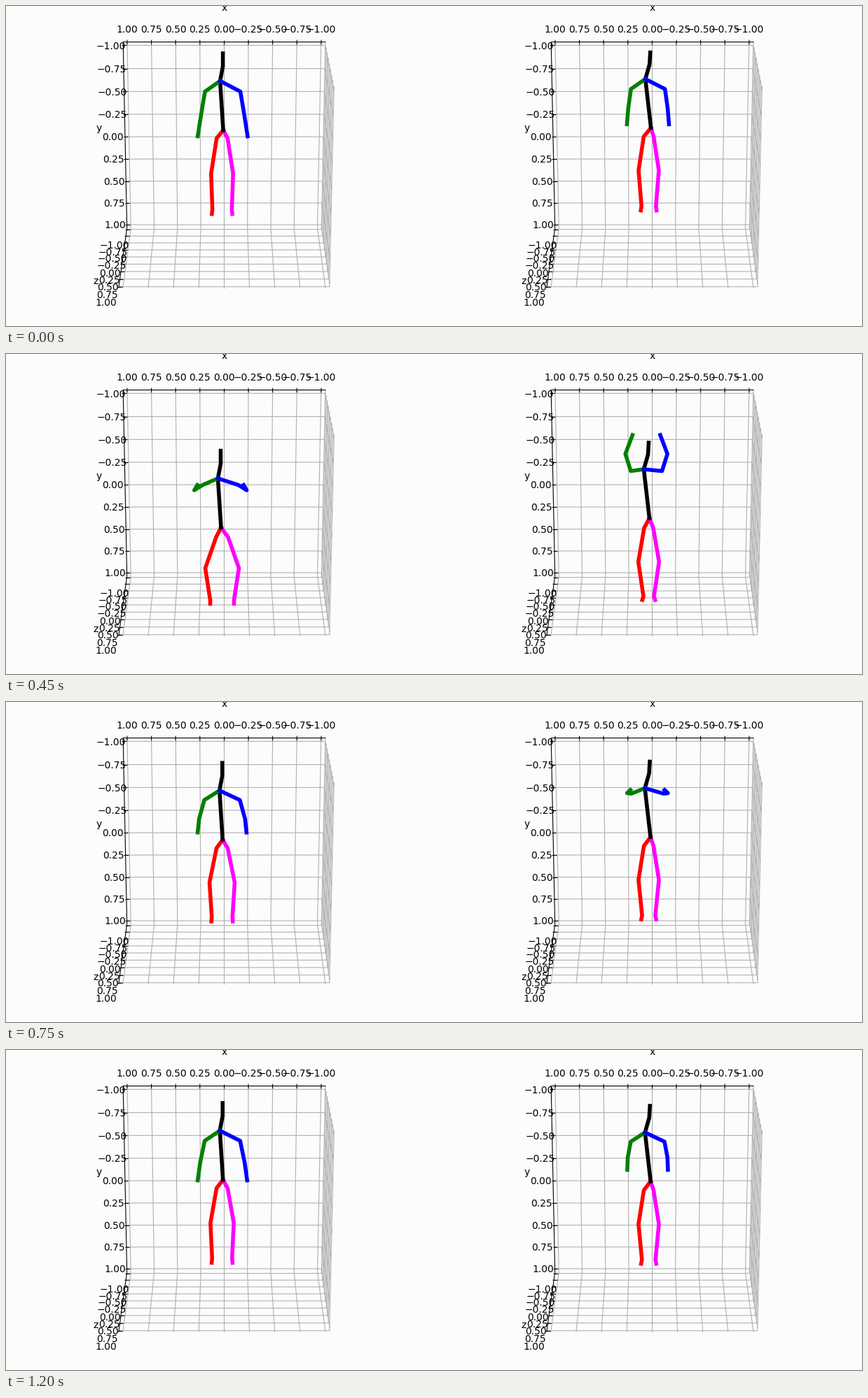
These frames come from a looping animation (1222x458 px, 1.25 s). A matplotlib script:

```python
import numpy as np
import matplotlib.pyplot as plt
from matplotlib.animation import FuncAnimation

WIDTH, HEIGHT, DPI = 1222, 458, 100
PANEL = WIDTH / 2
FRAMES, INTERVAL = 25, 50
TILT = np.radians(20)
FOCAL = HEIGHT / 0.185
EDGE = 25 / 24                       # the walls lie a little outside the ticks
TICKS = np.linspace(-1, 1, 9)
KEY_TIMES = np.array([0, 200, 450, 550, 650, 850, 1050, 1200.0])
SHOULDER_SHIFT = 3.7                 # middle of the shoulders, right of the chest joint

plt.rcParams["font.family"] = "DejaVu Sans"
fig = plt.figure(figsize=(WIDTH / DPI, HEIGHT / DPI), dpi=DPI, facecolor="#fcfcfc")
ax = fig.add_axes([0, 0, 1, 1])
ax.set(xlim=(0, WIDTH), ylim=(HEIGHT, 0))
ax.axis("off")


def project(x, y, z):
    """Perspective view from slightly above the front, in panel pixels."""
    x, y, z = x * 4 / 7, y * 4 / 7, z * 3 / 7
    depth = 10 + np.sin(TILT) * y - np.cos(TILT) * z
    rise = -np.cos(TILT) * y - np.sin(TILT) * z
    return 311.4 - FOCAL * x / depth, 223.4 - FOCAL * rise / depth


def path(offset, points, color):
    x, y = np.array([project(*p) for p in points]).T
    ax.plot(x + offset, y, color=color, lw=0.8, zorder=1 if color == "black" else 0,
            solid_capstyle="butt")


def label(x, y, text):
    ax.text(x, y, text, size=10, ha="center", va="baseline", zorder=5)


def draw_box(offset):
    e = EDGE
    outer, inner = e + 1 / 60, e - 1 / 30
    for t in TICKS:
        path(offset, [(t, -e, -e), (t, e, -e), (t, e, e)], "#b0b0b0")
        path(offset, [(e, t, -e), (-e, t, -e), (-e, t, e)], "#b0b0b0")
        path(offset, [(e, e, t), (-e, e, t), (-e, -e, t)], "#b0b0b0")
        path(offset, [(t, -outer, -e), (t, -inner, -e)], "black")
        path(offset, [(outer, t, -e), (inner, t, -e)], "black")
        path(offset, [(outer, e, t), (inner, e, t)], "black")

        text = f"{t:.2f}".replace("-", "\u2212")
        x, y = project(t, -e, -e)
        label(offset + x, y - 12.5, text)
        x, y = project(e, t, -e)
        label(offset + x - 17.2, y + 5.2, text)
        x, y = project(e, e, t)
        label(offset + x - 18.2, y + 27.4, text)

    path(offset, [(e, -e, -e), (-e, -e, -e)], "black")
    path(offset, [(e, -e, -e), (e, e, -e)], "black")
    path(offset, [(e, e, -e), (e, e, e)], "black")
    label(offset + 312, 7.2, "x")
    label(offset + 132.3, 178.7, "y")
    label(offset + 128, 398, "z")


def curve(*values):
    """Smooth curve through one value per key time, sampled at every frame."""
    steps = np.diff(KEY_TIMES)
    slopes = np.gradient(values, KEY_TIMES, edge_order=2)
    secants = np.abs(np.diff(values)) / steps
    limit = 3 * np.minimum(secants[:-1], secants[1:])
    slopes[1:-1] = np.clip(slopes[1:-1], -limit, limit)

    values = np.array(values)
    times = np.arange(FRAMES) * INTERVAL
    i = np.clip(np.searchsorted(KEY_TIMES, times, "right") - 1, 0, len(steps) - 1)
    u = (times - KEY_TIMES[i]) / steps[i]
    return ((1 + 2 * u) * (1 - u) ** 2 * values[i] + u * (1 - u) ** 2 * steps[i] * slopes[i]
            + u * u * (3 - 2 * u) * values[i + 1]
            + u * u * (u - 1) * steps[i] * slopes[i + 1])


def blend(start, end, amount):
    start, end = np.array(start), np.array(end)
    return start + amount[:, None, None] * (end - start)


lines = []


def add_line(offset, color, joints, zorder):
    line, = ax.plot([], [], color=color, lw=4, zorder=zorder)
    lines.append((line, joints + [offset, 0]))


def add_limb(offset, color, root, middle, shape, side, zorder):
    """Limb hanging at the root's height, mirrored about the middle line."""
    joints = shape * [side, 1]
    joints[..., 0] += np.reshape(middle, (-1, 1))
    joints[..., 1] += root[:, 1:]
    add_line(offset, color, np.concatenate([root[:, None], joints], axis=1), zorder)


def add_body(offset, depth, raising, trunk, fall, hips, arms, legs):
    """Squatting body; arms and legs are given as a standing and a squatting shape."""
    trunk = blend(trunk, np.add(trunk, fall), depth)
    pelvis, chest = trunk[:, 0], trunk[:, 1]
    arm, leg = blend(*arms, raising), blend(*legs, depth)
    shoulders = chest[:, 0] + SHOULDER_SHIFT
    add_limb(offset, "red", pelvis, hips, leg, -1, 2)
    add_limb(offset, "magenta", pelvis, hips, leg, 1, 2)
    add_line(offset, "black", trunk, 3)
    add_limb(offset, "green", chest, shoulders, arm, -1, 4)
    add_limb(offset, "blue", chest, shoulders, arm, 1, 4)


draw_box(0)
squat = curve(-0.04, 0, 1, 1.07, 0.66, 0, -0.03, 0.08)
add_body(
    0, squat, squat,
    trunk=[(310, 180.5), (305.5, 110), (309.5, 89), (309.5, 70.5)], fall=(-3, 68), hips=308.5,
    arms=([(25.3, 15), (31.2, 48), (35.5, 76.5)],
          [(25.5, 9.5), (37.5, 17), (33, 9.5)]),
    legs=([(7.8, 11.5), (16, 62), (14, 113), (14.7, 119.5)],
          [(8.5, 13.5), (24, 58), (17, 103.5), (17, 109)]))

draw_box(PANEL)
add_body(
    PANEL, curve(-0.12, 0, 1, 1.07, 0.61, 0.02, -0.02, 0.13),
    curve(0.09, 0, 1, 1, 0.94, 0.2, 0, 0.18),
    trunk=[(309.5, 181), (301.5, 111), (307.5, 90), (308.5, 73)], fall=(-2, 54), hips=306.5,
    arms=([(24.5, 15.5), (28, 48.5), (31, 76)],
          [(22.3, 2.5), (30, -22), (19.8, -49)]),
    legs=([(7, 12.5), (14.5, 61), (10, 112), (11, 118)],
          [(6.5, 14), (14.8, 62.5), (7.5, 112), (9.2, 117)]))


def update(frame):
    for line, joints in lines:
        line.set_data(*joints[frame].T)
    return [line for line, _ in lines]


anim = FuncAnimation(fig, update, frames=FRAMES, interval=INTERVAL, repeat=True, repeat_delay=0)
plt.show()
```
